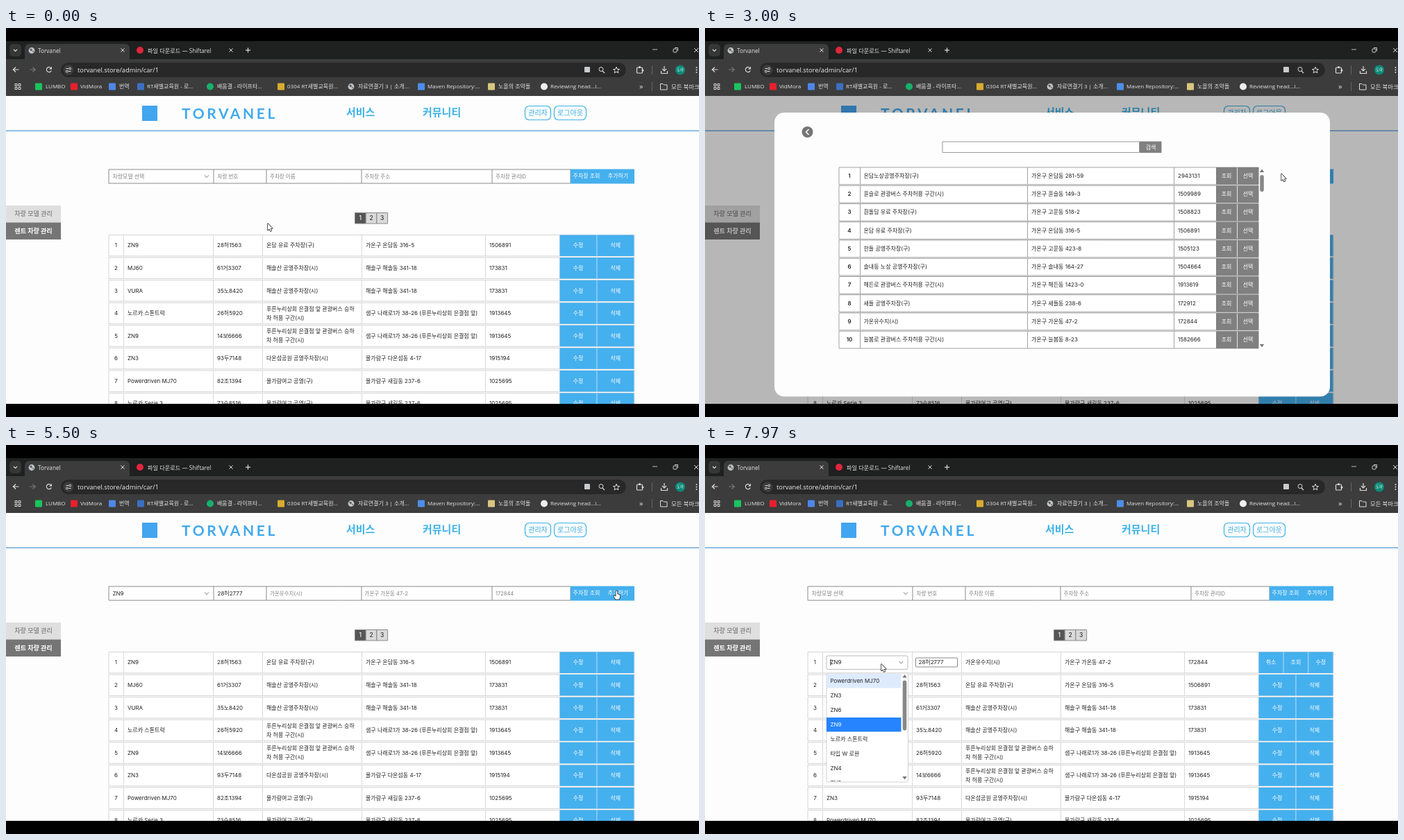
These frames come from a looping animation (998x561 px, 8000 ms). An HTML page with a canvas:

```html
<!DOCTYPE html>
<html lang="ko">
<head>
<meta charset="utf-8">
<title>Torvanel</title>
<style>
html, body { margin: 0; width: 100%; height: 100%; overflow: hidden; background: #000; }
canvas { display: block; width: 998px; height: 561px; }
</style>
</head>
<body>
<canvas id="stage"></canvas>
<script>
const W = 998, H = 561, LOOP = 8000;
const canvas = document.getElementById('stage');
const c = canvas.getContext('2d');
const dpr = window.devicePixelRatio || 1;
canvas.width = W * dpr;
canvas.height = H * dpr;

const PAGE = 'Inter, "Noto Sans CJK KR", sans-serif';
const UI = '"Open Sans", "Noto Sans CJK KR", sans-serif';
const BLUE = '#45b0ee', INK = '#222', PAPER = '#fdfdfd', GRAY = '#808080';

const PLATE = '28허2777';
const NEW_ROW = ['ZN9', PLATE, '가온유수지(시)', '가온구 가온동 47-2', '172844'];
const STORE = '푸른누리상회 은결점 앞';
const STOP = [STORE + ' 관광버스 승하', '차 허용 구간(시)'];
const CARS = [
  ['ZN9', '28허1563', '온담 유료 주차장(구)', '가온구 온담동 316-5', '1506891'],
  ['MJ60', '61거3307', '해솔산 공영주차장(시)', '해솔구 해솔동 341-18', '173831'],
  ['VURA', '35노8420', '해솔산 공영주차장(시)', '해솔구 해솔동 341-18', '173831'],
  ['노르카 스톤트럭', '26허5920', STOP, `샘구 나래로1가 38-26 (${STORE})`, '1913645'],
  ['ZN9', '14보6666', STOP, `샘구 나래로1가 38-26 (${STORE})`, '1913645'],
  ['ZN3', '93두7148', '다온섬공원 공영주차장(시)', '물가람구 다온섬동 4-17', '1915194'],
  ['Powerdriven MJ70', '82조1394', '물가람여고 공영(구)', '물가람구 새길동 237-6', '1025695'],
  ['노르카 Serie 3', '73수8516', '물가람여고 공영(구)', '물가람구 새길동 237-6', '1025695']
];
const LOTS = [
  ['늘봄로 관광버스 주차허용 구간(시)', '늘봄동 8-23', '1582666'],
  ['가온유수지(시)', '가온동 47-2', '172844'],
  ['새들 공영주차장(구)', '새들동 238-6', '172912'],
  ['해든로 관광버스 주차허용 구간(시)', '해든동 1423-0', '1913619'],
  ['솔내동 노상 공영주차장(구)', '솔내동 164-27', '1504664'],
  ['한들 공영주차장(구)', '고운동 423-8', '1505123'],
  ['온담 유료 주차장(구)', '온담동 316-5', '1506891'],
  ['흰돌담 유료 주차장(구)', '고운동 518-2', '1508823'],
  ['윤슬로 관광버스 주차허용 구간(시)', '윤슬동 149-3', '1509989'],
  ['온담노상공영주차장(구)', '온담동 281-59', '2943131']
];
const MODELS = ['Powerdriven MJ70', 'ZN3', 'ZN6', 'ZN9', '노르카 스톤트럭', '타입 W 로완', 'ZN4', 'ZN5'];

// Typed text: [time, value]
const PLATE_KEYS = [[0, ''], [1000, '2'], [1180, '28'], [1420, '28ㅎ'], [1540, '28허'],
  [1860, '28허2'], [2060, '28허27'], [2220, '28허277'], [2380, PLATE]];
const QUERY_KEYS = [[0, ''], [3360, 'ㄱ'], [3440, '가'], [3540, '강'], [3640, '가오'], [3700, '가온']];
// Pointer path: [time, x, y]
const PATH = [[0, 377, 282], [60, 377, 282], [300, 232, 211], [440, 232, 211], [690, 205, 301],
  [760, 205, 301], [950, 343, 214], [2380, 343, 214], [2530, 336, 214], [2600, 336, 214],
  [2880, 835, 211], [2980, 835, 211], [3260, 530, 172], [3860, 530, 172], [4340, 758, 235],
  [4900, 758, 235], [5060, 781, 237], [5160, 781, 237], [5440, 880, 211], [5580, 880, 211],
  [5860, 838, 251], [6360, 838, 251], [6560, 824, 311], [6800, 824, 311], [7300, 254, 316], [8000, 254, 316]];

const within = (t, a, b) => t >= a && t < b;
const lastKey = (keys, t) => keys.filter(k => k[0] <= t).pop()[1];

function pointerAt(t) {
  const i = Math.max(1, PATH.findIndex(p => p[0] > t));
  const [t0, x0, y0] = PATH[i - 1], [t1, x1, y1] = PATH[i];
  const u = (t - t0) / (t1 - t0), k = u * u * (3 - 2 * u);
  return [x0 + (x1 - x0) * k, y0 + (y1 - y0) * k];
}

function box(x, y, w, h, fill, stroke, r = 0, lw = 1) {
  c.beginPath();
  c.roundRect(x, y, w, h, r);
  if (fill) { c.fillStyle = fill; c.fill(); }
  if (stroke) { c.strokeStyle = stroke; c.lineWidth = lw; c.stroke(); }
}
function disc(x, y, r, fill, stroke, lw = 1) {
  box(x - r, y - r, 2 * r, 2 * r, fill, stroke, r, lw);
}
function line(color, lw, ...p) {
  c.beginPath();
  for (let i = 0; i < p.length; i += 2) c.lineTo(p[i], p[i + 1]);
  c.strokeStyle = color;
  c.lineWidth = lw;
  c.stroke();
}
function poly(fill, ...p) {
  c.beginPath();
  for (let i = 0; i < p.length; i += 2) c.lineTo(p[i], p[i + 1]);
  c.fillStyle = fill;
  c.fill();
}
// y is the vertical middle of the capitals
function text(s, x, y, { size = 8, color = INK, weight = 400, font = PAGE, align = 'left', gap = 0 } = {}) {
  c.font = `${weight} ${size}px ${font}`;
  c.letterSpacing = gap + 'px';
  c.textAlign = align;
  c.fillStyle = color;
  c.fillText(s, x, y + size * 0.36);
  return c.measureText(s).width;
}
const label = (s, x, y, color = '#fff', weight = 500, size = 8) =>
  text(s, x, y, { size, color, weight, align: 'center' });
function cross(x, y, r, color = '#ddd') {
  line(color, 1, x - r, y - r, x + r, y + r);
  line(color, 1, x + r, y - r, x - r, y + r);
}
function globe(x, y) {
  disc(x, y, 4.4, '#c4c7c9');
  poly('#5b5e61', x - 3, y - 2, x, y - 3, x + 1, y, x - 1, y + 1);
  poly('#5b5e61', x + 1, y + 1, x + 3.5, y, x + 2, y + 3);
}
function caret(x, y, h = 9) { box(x, y - h / 2, 0.9, h, '#111'); }
function chevron(x, y) { line('#aaa', 1.1, x - 3, y - 1.5, x, y + 1.5, x + 3, y - 1.5); }

function star(x, y) {
  const p = [];
  for (let i = 0; i <= 10; i++) {
    const r = i % 2 ? 2.1 : 4.8, a = -Math.PI / 2 + i * Math.PI / 5;
    p.push(x + r * Math.cos(a), y + r * Math.sin(a));
  }
  line('#ddd', 1, ...p);
}

function drawBrowser() {
  const ui = (s, x, y, size = 8.2, color = '#e3e3e3') => text(s, x, y, { size, color, font: UI });
  box(0, 19, W, 79, '#1f2020');
  box(0, 45, W, 53, '#3c3c3c');
  box(5, 23, 17, 18, '#353636', null, 5);
  line('#ddd', 1.2, 11, 31, 13.5, 33.5, 16, 31);
  box(27, 23, 151, 24, '#3c3c3c', null, [6, 6, 0, 0]);
  globe(37, 32.5);
  ui('Torvanel', 46, 33);
  cross(168, 32, 2.6);
  disc(193, 32, 5, '#e0263c');
  ui('파일 다운로드 — Shiftarel', 204, 33);
  cross(324, 32, 2.6);
  line('#ddd', 1.2, 345, 32, 352, 32);
  line('#ddd', 1.2, 348.5, 28.5, 348.5, 35.5);
  line('#bbb', 1, 931, 31, 938, 31);
  box(961, 30, 5, 5, null, '#ccc', 1);
  line('#ccc', 1, 963, 28.5, 967.5, 28.5, 967.5, 33);
  cross(994, 32, 3);

  line('#ddd', 1.2, 18.5, 60, 10.5, 60, 14, 56.5);
  line('#ddd', 1.2, 10.5, 60, 14, 63.5);
  line('#777', 1.2, 34, 60, 42, 60, 38.5, 56.5);
  line('#777', 1.2, 42, 60, 38.5, 63.5);
  c.beginPath();
  c.arc(62, 60, 3.6, 0.4, 5.3);
  c.strokeStyle = '#ddd'; c.lineWidth = 1.2; c.stroke();
  poly('#ddd', 66, 55.5, 66, 59.5, 62, 59.5);
  box(79, 50, 814, 21, '#282828', null, 10.5);
  disc(90, 60.5, 7.5, '#3c3c3c');
  line('#ddd', 1, 86.5, 58.5, 90, 58.5);
  disc(92.2, 58.5, 1.4, null, '#ddd');
  line('#ddd', 1, 90, 62.5, 93.5, 62.5);
  disc(87.8, 62.5, 1.4, null, '#ddd');
  ui('torvanel.store/admin/car/1', 103, 60.5, 9.3, '#eee');
  box(833, 56, 8, 8, '#c9ccce', null, 1);
  disc(857, 59.5, 3, null, '#ddd');
  line('#ddd', 1.3, 859, 62, 862, 65);
  star(879, 61);
  box(908.5, 57, 8, 8, null, '#ddd', 1, 1.2);
  disc(912.5, 56.5, 1.5, '#ddd');
  disc(917, 61, 1.5, '#ddd');
  line('#666', 1, 930.5, 54, 930.5, 67);
  line('#ddd', 1.2, 948, 55, 948, 62);
  line('#ddd', 1.2, 945, 59, 948, 62, 951, 59);
  line('#ddd', 1.2, 943.5, 62, 943.5, 65.5, 952.5, 65.5, 952.5, 62);
  disc(971, 60.5, 7, '#0b8a78');
  text('도아', 971, 60.5, { size: 5.5, color: '#fff', font: UI, align: 'center' });
  for (let i = -1; i < 2; i++) disc(994.5, 60.5 + i * 3.6, 1, '#ddd');

  for (let i = 0; i < 4; i++) box(13 + (i % 2) * 5, 80.5 + (i >> 1) * 5, 3, 3, null, '#ddd');
  const marks = [
    [47, '#1bc45c', 'LUMBO', 57], [98, '#e8202c', 'VidMora', 107], [153, '#4f86e8', '번역', 163],
    [194, '#3b6fc0', 'RT새별교육원 - 로...', 203], [294, '#17b06b', '배움결 - 라이프타...', 304],
    [396, '#d7ac2f', '0304 RT새별교육원...', 405], [497, '', '자료연결기 3 | 소개...', 507],
    [598, '#4c8ee8', 'Maven Repository:...', 607], [699, '#d9c77e', '노을의 조약돌', 709],
    [775, '#eee', 'Reviewing head...l...', 784]
  ];
  marks.forEach(([x, color, name, tx], i) => {
    if (!color) globe(x, 84.5);
    else if (i === 4 || i === 9) disc(x, 84.5, 5, color);
    else box(x - 5, 79.5, 10, 10, color, null, 1);
    ui(name, tx, 84.5, 8);
  });
  ui('»', 912, 84, 11);
  line('#666', 1, 930.5, 78, 930.5, 91);
  line('#ddd', 1, 942.5, 80.5, 946, 80.5, 947.5, 82, 952, 82, 952, 89, 942.5, 89, 942.5, 80);
  ui('모든 북마크', 958, 84.5, 8.4);
}

function drawHeader() {
  box(0, 98, W, 444, PAPER);
  box(196, 112, 22, 22, '#42a5f0');
  text('TORVANEL', 253, 123, { size: 21, weight: 700, color: '#42a9ee', font: 'Lato, sans-serif', gap: 3.6 });
  const nav = { size: 15, weight: 700, color: '#3cb2e6' };
  text('서비스', 490, 122, nav);
  text('커뮤니티', 600, 122, nav);
  for (const [s, x, w] of [['관리자', 747.5, 37], ['로그아웃', 789.5, 46]]) {
    box(x, 112.5, w, 20, null, '#3cb2e6', 6, 1.2);
    label(s, x + w / 2, 122.5, '#35abe2', 500, 10);
  }
  line('#6fa9dc', 1.6, 0, 148.2, W, 148.2);
  box(0, 256, 79, 24.5, '#dfdfdf');
  label('차량 모델 관리', 39.5, 268, '#666', 500, 9);
  box(0, 280.5, 79, 24.5, '#757575');
  label('렌트 차량 관리', 39.5, 293, '#fff', 700, 9);
}

function drawForm(s) {
  const y = 214, edges = [148, 299, 375, 512, 700, 813];
  box(148, 204, 665, 20, '#fff', '#8a8a8a');
  edges.slice(1, 5).forEach(x => line('#8a8a8a', 1, x, 204, x, 224));
  const place = (v, hint, x, size = 7.5) =>
    text(v || hint, x, y, { size: v ? 8 : size, color: v ? INK : GRAY });
  place(s.model, '차량모델 선택', 153.5, 7.9);
  chevron(289, y);
  const w = place(s.plate, '차량 번호', 304.5);
  const dim = { size: 7.5, color: GRAY };
  text(s.lot ? NEW_ROW[2] : '주차장 이름', 380, y, dim);
  text(s.lot ? NEW_ROW[3] : '주차장 주소', 516.5, y, dim);
  text(s.lot ? NEW_ROW[4] : '주차장 관리ID', 705, y, dim);
  if (s.plateFocus) {
    box(299, 204, 76, 20, null, '#111', 2, 1.8);
    caret(304.5 + (s.plate ? w : 0), y);
  }
  box(813, 203.5, 92, 21, BLUE);
  label('주차장 조회', 836, 213.5);
  label('추가하기', 881.5, 213.5);
}

function drawPages() {
  for (let i = 0; i < 3; i++) {
    box(502.5 + i * 15.7, 266.5, 15.7, 15.5, i ? '#dadada' : '#555', '#888');
    label(i + 1, 510.3 + i * 15.7, 274, i ? '#333' : '#fff', 500, 8.5);
  }
}

function drawCars(s) {
  const rows = s.added ? [NEW_ROW, ...CARS] : CARS;
  const cols = [148, 169.5, 298.5, 369.5, 512.5, 690.5, 797.5];
  rows.slice(0, 8).forEach((row, i) => {
    const top = 298.5 + i * 32.58, y = top + 15, edit = s.editing && i === 0;
    box(148, top, 757, 30.4, '#fff', '#d4d4d4');
    cols.slice(1).forEach(x => line('#d9d9d9', 1, x, top, x, top + 30.4));
    label(i + 1, 158.5, y, INK, 400);
    row.forEach((v, j) => {
      const x = cols[j + 1] + 5.5;
      if (edit && j < 2) return;
      if (Array.isArray(v)) v.forEach((part, k) => text(part, x, y - 6.5 + k * 13));
      else text(v, x, y);
    });
    if (edit) {
      box(175, 304, 117, 19.5, '#fff', '#bbb', 2);
      text(row[0], 180.5, y);
      if (s.editMenu) caret(180.5, y);
      chevron(282.5, y);
      box(303.5, 307, 60, 13, '#fff', '#888', 1);
      text(row[1], 307.5, y);
    }
    const names = edit ? ['취소', '조회', '수정'] : ['수정', '삭제'];
    const w = 107.5 / names.length;
    names.forEach((name, k) => {
      box(797.5 + k * w, top, w - 0.6, 30.4, BLUE);
      label(name, 797.5 + (k + 0.5) * w - 0.3, y);
    });
  });
}

function drawMenu(x, y, w, focus, chosen) {
  box(x, y, w, 157, '#fff', '#d0d0d0', 2);
  c.save();
  c.beginPath();
  c.rect(x, y, w, 156);
  c.clip();
  MODELS.forEach((name, i) => {
    const top = y + 1 + i * 21;
    const fill = i === chosen ? '#2684ff' : i === focus ? '#deebff' : null;
    if (fill) box(x, top, w - 10, 20.5, fill);
    text(name, x + 5.5, top + 10.3, { color: i === chosen ? '#fff' : INK });
  });
  c.restore();
  scrollbar(x + w - 5, y + 4.5, y + 151, 72);
}

function scrollbar(x, top, bottom, thumb) {
  poly('#777', x - 3.2, top + 2, x + 3.2, top + 2, x, top - 2.5);
  poly('#777', x - 3.2, bottom - 2, x + 3.2, bottom - 2, x, bottom + 2.5);
  box(x - 2.8, top + 6, 5.6, thumb, '#888', null, 2.8);
}

function drawMap() {
  c.save();
  c.beginPath();
  c.rect(313, 253, 363, 210);
  c.clip();
  box(313, 253, 363, 210, '#f3f2ee');
  const roads = [
    [313, 322, 392, 253], [392, 463, 387, 410, 391, 345, 399, 302, 412, 283, 425, 287, 480, 336, 600, 442, 625, 463],
    [442, 253, 560, 357, 676, 458], [505, 253, 628, 348], [575, 253, 676, 335],
    [394, 352, 470, 418, 522, 463], [391, 404, 455, 463],
    [408, 463, 470, 395, 545, 326, 622, 253], [598, 446, 676, 366], [430, 290, 470, 253], [313, 412, 388, 400]
  ];
  c.lineJoin = 'round';
  roads.forEach(p => line('#e1e0dd', 10, ...p));
  roads.forEach(p => line('#fcfcfb', 8, ...p));
  c.translate(645, 268);
  c.rotate(0.75);
  label('가온대로2길', 0, 0, '#aaa', 400, 6);
  c.restore();
  text('1-268', 340, 260, { size: 5.5, color: '#b9b09a' });
  c.beginPath();
  c.moveTo(495, 373);
  c.bezierCurveTo(492, 366, 487.5, 364, 487.5, 358);
  c.arc(495, 358, 7.5, Math.PI, 0);
  c.bezierCurveTo(502.5, 364, 498, 366, 495, 373);
  c.fillStyle = '#2a83dc';
  c.fill();
  disc(495, 358, 2.8, '#fff');
  disc(503, 393.5, 4, '#a9b4c0');
  label('P', 503, 393.5, '#fff', 700, 5.5);
  label('공영', 503, 402, '#8b98a8', 500, 6);
}

function drawModal(s) {
  box(0, 98, W, 444, 'rgba(0,0,0,.28)');
  box(100, 122, 800, 409.5, PAPER, null, 14);
  disc(147.5, 150, 8, '#757575');
  line('#fff', 1.5, 149.5, 146, 145.5, 150, 149.5, 154);
  box(342, 164, 283.5, 15.5, '#fff', s.queryFocus ? '#111' : '#999', s.queryFocus ? 2 : 0, s.queryFocus ? 1.8 : 1);
  const w = text(s.query, 347.5, 171.7);
  if (s.queryFocus) caret(347.5 + (s.query ? w : 0), 171.7);
  box(626, 163.5, 31.5, 16.5, GRAY);
  label('검색', 642, 171.7);

  const rows = s.found ? LOTS : LOTS.slice().reverse();
  rows.slice(0, s.map ? 2 : 10).forEach(([name, addr, id], i) => {
    const top = 201 + i * 26.25, y = top + 12;
    box(193, top, 604, 24.8, '#fff', '#a2a2a2');
    [223.5, 464.5, 675.5].forEach(x => line('#a2a2a2', 1, x, top, x, top + 24.8));
    label(i + 1, 208, y, INK, 600);
    text(name, 228.5, y);
    text('가온구 ' + addr, 470, y);
    text(id, 681, y);
    box(736, top, 30.2, 24.8, GRAY);
    box(767, top, 30.2, 24.8, GRAY);
    label(s.map && i === 1 ? '접기' : '조회', 751, y);
    label('선택', 782, y);
  });
  if (s.map) drawMap();
  scrollbar(802, 206, 458, s.map ? 71 : s.found ? 96 : 24);
}

function drawAlert() {
  box(0, 98, W, 444, 'rgba(0,0,0,.58)');
  c.save();
  c.shadowColor = 'rgba(0,0,0,.5)';
  c.shadowBlur = 8;
  box(357.5, 73, 294.5, 96.5, '#1f2020', null, 7);
  c.restore();
  text('www.torvanel.store 내용:', 370.5, 95, { size: 10.4, color: '#e8e8e8', font: UI });
  text('렌트차량이 추가되었습니다.', 370.5, 114, { size: 8.8, color: '#d6d6d6', font: UI });
  box(594.8, 128.8, 46.4, 29, null, '#a8c7fa', 14.5, 1.6);
  box(597, 131, 42, 24.6, '#a8c7fa', null, 12.3);
  label('확인', 618, 143.5, '#1d3c70', 500, 8.5);
}

function drawPointer(kind, x, y) {
  if (kind === 'beam') {
    line('#222', 1, x, y - 4, x, y + 4);
    line('#222', 1, x - 2, y - 4.3, x + 2, y - 4.3);
    line('#222', 1, x - 2, y + 4.3, x + 2, y + 4.3);
    return;
  }
  c.save();
  c.translate(x, y);
  c.lineJoin = 'round';
  const shape = kind === 'hand'
    ? 'M-1.6 0Q-.6-1.4.4 0V4L3.5 5Q4.6 5.5 4.2 8L3.2 11.5H-2L-4.6 7.4Q-4.4 5.8-3 6.6L-1.6 7.8Z'
    : 'M0 0V9.6L2.2 7.6 3.8 11 5.2 10.3 3.7 7.1H6.7Z';
  const p = new Path2D(shape);
  c.strokeStyle = '#222';
  c.lineWidth = 1.5;
  c.stroke(p);
  c.fillStyle = '#fff';
  c.fill(p);
  c.restore();
}

function pointerKind(t) {
  if (within(t, 900, 2640) || within(t, 3200, 3900)) return 'beam';
  if (within(t, 2840, 2960) || within(t, 5380, 6900)) return 'hand';
  return 'arrow';
}

function draw(t) {
  const done = t >= 6350;
  const s = {
    model: within(t, 740, 6350) ? 'ZN9' : '',
    plate: done ? '' : lastKey(PLATE_KEYS, t),
    plateFocus: within(t, 960, 2920),
    lot: within(t, 5120, 6350),
    added: t >= 6430,
    editing: t >= 6800,
    editMenu: t >= 7420,
    query: lastKey(QUERY_KEYS, t),
    queryFocus: within(t, 3280, 4420),
    found: t >= 3720,
    map: t >= 4420
  };
  const [x, y] = pointerAt(t);
  c.setTransform(dpr, 0, 0, dpr, 0, 0);
  box(0, 0, W, H, '#000');
  drawHeader();
  drawForm(s);
  drawPages();
  drawCars(s);
  if (within(t, 340, 740)) drawMenu(148, 230, 151, Math.max(0, Math.floor((y - 231) / 21)), -1);
  if (s.editMenu) drawMenu(175, 329, 117.5, 0, 3);
  if (within(t, 2940, 5120)) drawModal(s);
  drawBrowser();
  if (within(t, 5620, 6350)) drawAlert();
  drawPointer(pointerKind(t), x, y);
  box(0, 0, W, 19, '#000');
  box(0, 542, W, 19, '#000');
}

const start = performance.now();
function tick() {
  draw((performance.now() - start) % LOOP);
  requestAnimationFrame(tick);
}
tick();
</script>
</body>
</html>
```
